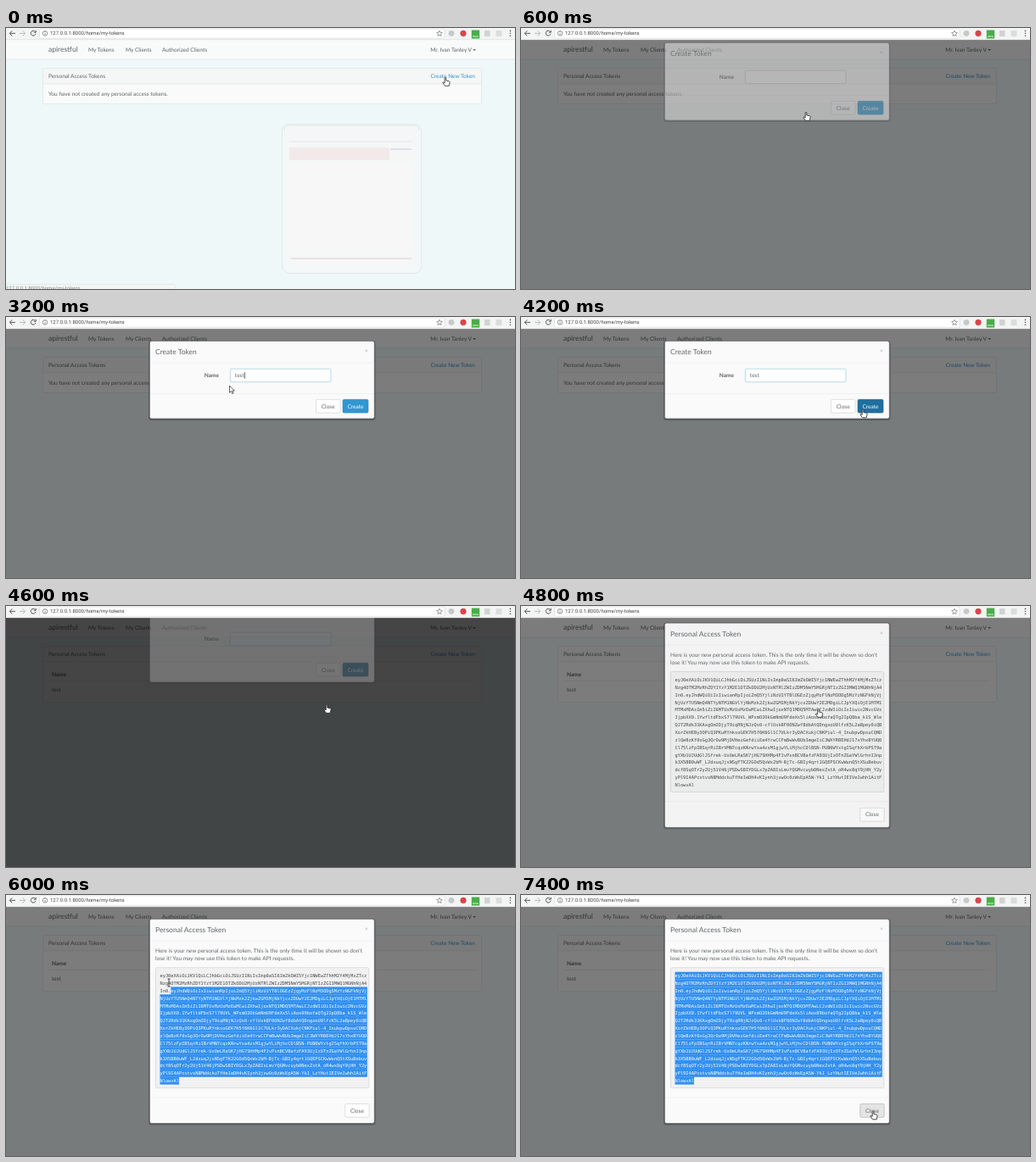
An HTML page for the animation above (8 s loop, 600 by 308 pixels).

```html
<!DOCTYPE html>
<html lang="en">
<head>
<meta charset="utf-8">
<title>Personal access tokens</title>
<style>
  html, body { margin: 0; width: 100%; height: 100%; overflow: hidden; background: #eff8f8; }
  svg { display: block; width: 100vw; height: 100vh; }
  text { font-family: Lato, "Open Sans", sans-serif; font-size: 6.55px; fill: #606568; text-rendering: geometricPrecision; }
  .url { font-family: Roboto, sans-serif; font-size: 6px; fill: #444; }
  .brand { font-size: 8.5px; }
  .bold { font-weight: 700; }
  .link { fill: #3691cb; }
  .hover { fill: #216a94; text-decoration: underline; }
  .end { text-anchor: end; }
  .mid { text-anchor: middle; }
  .code { font-family: "DejaVu Sans Mono", monospace; font-size: 5.34px; fill: #444; }
  .hidden { display: none; }
</style>
</head>
<body>
<svg id="stage" viewBox="0 0 600 308" preserveAspectRatio="none"></svg>
<script>
const LOOP = 8000;
const COLUMNS = 76, CHAR = 5.34 * 0.602, PITCH = 8.857;
const CODE_X = 181.5, CODE_Y = 97.2;

// A signed token: header.payload.signature
function makeToken() {
  const jti = 'fd9b9b755a0e8a3f8231e7378893634ad65c653a' +
              '596d85625354eeb3d396f90dc523db71d50ca608';
  const pack = o => btoa(JSON.stringify(o)).replace(/=+$/, '');
  const issued = 1513513100;
  const header = pack({ typ: 'JWT', alg: 'RS256', jti });
  const payload = pack({ aud: '1', jti, iat: issued, nbf: issued, exp: issued + 31536000, sub: '1', scopes: [] });
  const letters = 'ABCDEFGHIJKLMNOPQRSTUVWXYZ';
  const alphabet = letters + letters.toLowerCase() + '0123456789-_';
  let seed = 71, signature = '';
  for (let i = 0; i < 683; i++) {
    seed = (seed * 16807) % 2147483647;
    signature += alphabet[(seed >> 8) % 64];
  }
  return `${header}.${payload}.${signature}`;
}
const token = makeToken();

const text = (x, y, str, cls = '', attrs = '') =>
  `<text x="${x}" y="${y}" class="${cls}" ${attrs}>${str}</text>`;
const rect = (x, y, w, h, fill, attrs = '') =>
  `<rect x="${x}" y="${y}" width="${w}" height="${h}" fill="${fill}" ${attrs}/>`;
const line = (x1, x2, y, color) =>
  `<path d="M${x1} ${y}H${x2}" stroke="${color}" stroke-width=".6"/>`;
const stroke = (d, color, width = 1) =>
  `<path d="${d}" fill="none" stroke="${color}" stroke-width="${width}"/>`;
const dot = (x, y, r, fill) => `<circle cx="${x}" cy="${y}" r="${r}" fill="${fill}"/>`;
const group = (id, body, cls = '') => `<g id="${id}" class="${cls}">${body}</g>`;
const border = color => `stroke="${color}" stroke-width=".6" rx="1.6"`;

const toolbar =
  rect(0, 0, 600, 14, '#f3f4f4') + rect(39.5, 1, 477.5, 11.2, '#fff', border('#d3d5d5')) +
  line(0, 600, 13.7, '#d8dada') +
  stroke('M11 6.3H4.5M7.3 3.3L4.3 6.3L7.3 9.3', '#555') +
  stroke('M16 6.3H22.5M19.7 3.3L22.7 6.3L19.7 9.3', '#bbb') +
  stroke('M34.5 4.4A2.9 2.9 0 1 0 35 6.8M35.2 2.8V5.2H32.7', '#555') +
  '<circle cx="46" cy="6.3" r="2.8" fill="none" stroke="#666" stroke-width=".7"/>' +
  stroke('M46 5.8V8M46 4.3V5', '#666', .8) +
  text(52, 8.4, '127.0.0.1:8000/home/my-tokens', 'url') +
  '<path d="M511 3l1 2.3 2.4.2-1.9 1.6.6 2.4-2.1-1.3-2.1 1.3.6-2.4-1.9-1.6 2.4-.2z" fill="none" stroke="#666" stroke-width=".6"/>' +
  dot(525, 6.3, 3.4, '#c6c9ca') + dot(539, 6.3, 3.6, '#d8454b') +
  rect(548.8, 2.5, 9.4, 10, '#48ad48') +
  text(553.5, 11.4, 'new', 'mid', 'style="font-size:4px;fill:#fff"') +
  rect(564, 3, 6.5, 7, '#d2d2d2') + rect(577.5, 3, 7, 7, '#dcdcdc') +
  [3.4, 6.3, 9.2].map(y => dot(594.5, y, .8, '#555')).join('');

const navbar =
  rect(0, 14, 600, 23, '#f9fafa') + line(0, 600, 37, '#d5e0e3') +
  text(50, 28.4, 'apirestful', 'brand') + text(97, 28, 'My Tokens') +
  text(141, 28, 'My Clients') + text(184, 28, 'Authorized Clients') +
  text(549, 28, 'Mr. Ivan Tanley V', 'end') +
  '<path d="M550.4 25h3.6l-1.8 2z" fill="#666"/>';

const panel = height =>
  rect(43.5, 47.5, 517, height, '#fafafa', border('#d8dfe0')) +
  rect(44, 48, 516, 18, '#f5f6f6') + line(44, 560, 66, '#d8dfe0') +
  text(50, 59, 'Personal Access Tokens') +
  text(553, 59, 'Create New Token', 'link end');

const emptyPanel = panel(42) + text(50, 80, 'You have not created any personal access tokens.');
const listPanel = panel(66) + text(54, 83, 'Name', 'bold') + line(50, 553, 88.6, '#d8dfe0') + text(54, 101, 'test');

// Faint remains of a window that has just closed
const ghost =
  rect(325.5, 113.5, 164, 176, '#f3f7f7', 'rx="8" stroke="#e2e8e8"') +
  rect(331, 121, 152, 158, '#f5f7f7', 'rx="3"') +
  stroke('M328 121Q328 115 334 115H481Q487 115 487 121', '#d9dfdf', .8) +
  stroke('M334 134H478', '#e0e7e7', 1.2) +
  rect(334, 141, 118, 15, '#f2e9ea') + rect(453, 142, 25, 2, '#dfdfec') +
  rect(334, 163, 144, 97, '#f8f7f7') +
  stroke('M336 272H478', '#ecdfe2', 2);

const status =
  rect(-1, 302.5, 201, 8, '#f3f6f6', border('#dbe2e2')) +
  text(0, 309, '127.0.0.1:8000/home/my-tokens', 'url', 'opacity=".6"');

const modalFrame = (height, title, footerY) =>
  rect(168, 28, 267.5, height + 2.2, '#000', 'rx="3" opacity=".25"') +
  rect(169.3, 28.3, 265, height, '#fafafa', 'rx="2.5" stroke="#555" stroke-width=".7"') +
  text(176, 43.8, title, 'brand') + text(425, 42.3, '×', 'mid', 'opacity=".5"') +
  line(170, 434, 54, '#e9e9e9') + line(170, 434, footerY, '#e9e9e9');

const closeButton = (x, y, id) =>
  rect(x, y, 28.5, 15.8, '#fff', `id="${id}" ${border('#ccc')}`) + text(x + 14.2, y + 10.2, 'Close', 'mid');

const createModal =
  modalFrame(91.7, 'Create Token', 90.5) +
  text(251, 71, 'Name', 'bold end') +
  rect(264.4, 61.2, 118.6, 15.5, '#fff', `id="field" ${border('#bbb')}`) +
  text(269.8, 71, '', '', 'id="typed"') +
  rect(0, 65.2, .7, 7.4, '#333', 'id="caret"') +
  closeButton(365.5, 97.3, 'close1') +
  rect(397, 97.3, 30, 15.8, '#3097d1', `id="create" ${border('#2a88bd')}`) +
  text(412, 107.5, 'Create', 'mid', 'style="fill:#fff"');

const tokenModal =
  modalFrame(241.3, 'Personal Access Token', 239) +
  text(176, 68, "Here is your new personal access token. This is the only time it will be shown so don't") +
  text(176, 77, 'lose it! You may now use this token to make API requests.') +
  rect(176.3, 85.7, 251.5, 142, '#f1f1f1', border('#ccc')) +
  group('code', '') + closeButton(399.7, 246.5, 'close2');

const cursors =
  group('arrow', '<path d="M0 0V8.2L1.9 6.5L3.2 9.4L4.6 8.8L3.3 6H5.8Z" fill="#fff" stroke="#222" stroke-width=".7"/>') +
  group('hand', '<path d="M-.8 .8Q0-.5 .8 .8V4L4.4 4.8Q5.3 5.2 5 6.6L4.2 10.3H-.6L-3.2 6.4Q-2.7 5.3-.8 6.8Z" fill="#fff" stroke="#222" stroke-width=".8"/>') +
  group('beam', stroke('M-1.6 0H1.6M0 0V9M-1.6 9H1.6', '#222', .8));

document.getElementById('stage').innerHTML =
  rect(0, 0, 600, 308, '#eff8f8') + navbar +
  group('empty', emptyPanel) + group('list', listPanel) +
  group('ghost', ghost) + group('status', status) +
  rect(0, 14, 600, 294, '#000', 'id="shade"') +
  group('createModal', createModal) + group('tokenModal', tokenModal) +
  toolbar + cursors;

const $ = id => document.getElementById(id);
const show = (id, on) => $(id).classList.toggle('hidden', !on);

function drawToken(selectFrom) {
  let out = '';
  for (let start = 0, row = 0; start < token.length; start += COLUMNS, row++) {
    const chars = token.slice(start, start + COLUMNS);
    const cut = Math.max(0, Math.min(chars.length, selectFrom - start));
    const y = CODE_Y + row * PITCH;
    if (cut < chars.length)
      out += rect(CODE_X + cut * CHAR, y - 6.5, (chars.length - cut) * CHAR, PITCH + .1, '#3390f0');
    out += text(CODE_X, y, `${chars.slice(0, cut)}<tspan fill="#fff">${chars.slice(cut)}</tspan>`, 'code');
  }
  $('code').innerHTML = out;
}

// Each step changes only the listed parts of the state before it
const start = {
  cursor: ['hand', 518, 58], fresh: true, hover: false, shade: 0, saved: false, modal: '', alpha: 1, lift: 0,
  focus: false, typed: '', caret: 0, press: 0, select: Infinity, closeHover: false
};
const changes = [
  [0, {}],
  [200, { fresh: false, hover: true }],
  [600, { hover: false, shade: .5, modal: 'createModal', alpha: .45, lift: 11, cursor: ['hand', 336, 99] }],
  [800, { alpha: 1, lift: 0, focus: true, caret: 269.9, cursor: ['arrow', 263.5, 91] }],
  [1000, { cursor: ['arrow', 263.5, 81] }],
  [1400, { caret: 0 }],
  [1600, { typed: 't', caret: 272.3 }],
  [1800, { typed: 'tes', caret: 279.1 }],
  [2200, { typed: 'test', caret: 281.2 }],
  [2600, { caret: 0 }],
  [3200, { caret: 281.2 }],
  [3800, { caret: 0, cursor: ['arrow', 436, 101.5] }],
  [4000, { press: 1, cursor: ['hand', 410, 105.5] }],
  [4200, { press: 2, cursor: ['hand', 403, 108.5] }],
  // Both dialogs' backdrops overlap while the first dialog fades out
  [4600, { saved: true, typed: '', shade: .72, alpha: .25, lift: 30, cursor: ['hand', 378, 116] }],
  [4800, { shade: .5, modal: 'tokenModal', alpha: .95, lift: 8.2, cursor: ['hand', 350.5, 121] }],
  [5000, { alpha: 1, lift: 0, cursor: ['beam', 238, 189.5] }],
  [5400, { cursor: ['beam', 214, 208.5] }],
  [5600, { cursor: ['beam', 209, 218.5] }],
  [6000, { select: 156, cursor: ['beam', 192, 99] }],
  [6200, { select: 1, cursor: ['beam', 185.5, 92] }],
  [6600, { select: 0, cursor: ['beam', 181.5, 104.5] }],
  [6800, { cursor: ['beam', 250, 134.5] }],
  [7200, { cursor: ['arrow', 431, 281] }],
  [7400, { closeHover: true, cursor: ['hand', 415, 254.5] }]
];
let last = start;
const steps = changes.map(([at, change]) => ({ at, state: last = { ...last, ...change } }));

const buttonColors = ['#3097d1', '#2579a9', '#1f6f9f'];

function draw(s) {
  show('ghost', s.fresh);
  show('status', s.fresh);
  show('empty', !s.saved);
  show('list', s.saved);
  document.querySelector('#empty .link').classList.toggle('hover', s.hover);
  $('shade').setAttribute('opacity', s.shade);
  for (const id of ['createModal', 'tokenModal']) {
    show(id, s.modal === id);
    $(id).setAttribute('opacity', s.alpha);
    $(id).setAttribute('transform', `translate(0 ${-s.lift})`);
  }
  $('field').setAttribute('stroke', s.focus ? '#8ac3dd' : '#bbb');
  $('typed').textContent = s.typed;
  show('caret', s.caret > 0);
  $('caret').setAttribute('x', s.caret);
  $('create').setAttribute('fill', buttonColors[s.press]);
  $('create').setAttribute('stroke', s.press ? '#1c5f88' : '#2a88bd');
  $('close2').setAttribute('fill', s.closeHover ? '#e4e4e4' : '#fff');
  $('close2').setAttribute('stroke', s.closeHover ? '#aaa' : '#ccc');
  drawToken(s.select);
  const [kind, x, y] = s.cursor;
  for (const id of ['arrow', 'hand', 'beam']) show(id, id === kind);
  $(kind).setAttribute('transform', `translate(${x} ${y})`);
}

const began = performance.now();
let current = null;
function tick() {
  const time = (performance.now() - began) % LOOP;
  const step = steps.findLast(s => s.at <= time);
  if (step !== current) draw((current = step).state);
  requestAnimationFrame(tick);
}
tick();
</script>
</body>
</html>
```
